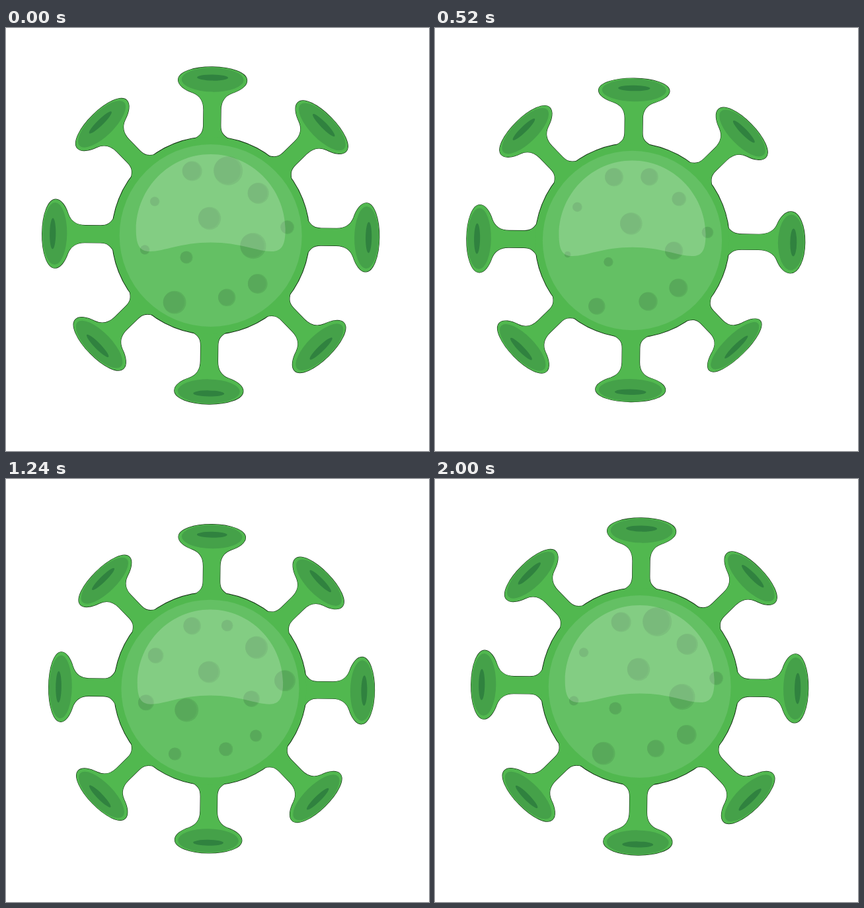
An HTML page with a canvas for the animation above (2040 ms loop, 640 by 640 pixels).

```html
<!DOCTYPE html>
<html lang="en">
<head>
<meta charset="utf-8">
<title>Wobbling virus</title>
<style>
  html, body { margin: 0; width: 100%; height: 100%; overflow: hidden; background: #fff; }
  canvas { display: block; width: 100vmin; height: 100vmin; }
</style>
</head>
<body>
<canvas id="stage" width="640" height="640"></canvas>
<script>
const ctx = document.getElementById('stage').getContext('2d');
const LOOP = 2040, SPAN = 2000, STEP = 40, TURN = 2 * Math.PI;
const BODY = '#51b84f', EDGE = '#143314';
const SPIKES = 8, LAG = 117.5, TILT = 0.7 * Math.PI / 180;

// Path of the centre: time, x, y
const DRIFT = [
  [0, 309.7, 314], [200, 306.2, 318.4], [520, 298.5, 321.5], [720, 295.6, 317.6],
  [1000, 301.6, 314.6], [1480, 314.3, 319.6], [SPAN, 309.7, 314]
];

// Squash, stretch and settle of one spike: time, width, length
const WOBBLE = [[0, 1, 1], [140, 1.07, 0.865], [310, 0.9, 1.12], [460, 1.06, 0.94], [600, 1, 1]];

// Each crater swells and shrinks once per loop: x, y, mean radius, swing, time of its peak
const CRATERS = [
  [-28, -97.5, 14, 1, 0],
  [26.5, -98, 14.2, 7.8, 1980],
  [72, -64, 15, 4.3, 1580],
  [-84.5, -51.5, 9.1, 2.7, 1250],
  [-1.7, -26, 16.8, 0.4, 0],
  [116, -12.5, 12.2, 4, 1350],
  [64.2, 15.7, 15, 4.7, 1930],
  [-36.6, 33, 12.3, 6, 1350],
  [-99.5, 21.6, 8.5, 4, 1400],
  [71.1, 73, 12.3, 3.2, 200],
  [24.5, 93.8, 12.4, 2, 370],
  [-54.6, 101.2, 13, 4.4, 0]
];

const spike = new Path2D(`M-26 -146 C-16 -152 -13 -157 -13 -167 L-13 -190
  C-13 -203 -19 -212 -30 -216 C-42 -220 -52 -227 -52 -235
  C-52 -247 -28 -255 0 -255 C28 -255 52 -247 52 -235
  C52 -227 42 -220 30 -216 C19 -212 13 -203 13 -190
  L13 -167 C13 -157 16 -152 26 -146 Z`);
const shine = new Path2D(`M0 -123 C62 -123 112 -72 113 -10 C113 14 108 24 92 24
  C70 24 45 10.5 0 10.5 C-45 10.5 -70 24 -92 24 C-108 24 -113 14 -113 -10
  C-112 -72 -62 -123 0 -123 Z`);

// Hermite curve through the keys, held at both ends; returns [first, second] value
function smooth(keys, time) {
  const last = keys.length - 1;
  const t = Math.min(Math.max(time, keys[0][0]), keys[last][0]);
  let i = 0;
  while (i < last - 1 && t > keys[i + 1][0]) i++;
  const a = keys[i], b = keys[i + 1];
  const before = keys[Math.max(i - 1, 0)], after = keys[Math.min(i + 2, last)];
  const d = b[0] - a[0], u = (t - a[0]) / d, v = 1 - u;
  return [1, 2].map(c => {
    const slopeA = (b[c] - before[c]) / (b[0] - before[0]);
    const slopeB = (after[c] - a[c]) / (after[0] - a[0]);
    return v * v * (1 + 2 * u) * a[c] + u * u * (3 - 2 * u) * b[c]
         + d * u * v * (v * slopeA - u * slopeB);
  });
}

function ellipse(x, y, rx, ry, color) {
  ctx.beginPath();
  ctx.ellipse(x, y, rx, ry, 0, 0, TURN);
  ctx.fillStyle = color;
  ctx.fill();
}

// Spikes wobble one after another, clockwise from the top
function eachSpike(t, paint) {
  for (let i = 0; i < SPIKES; i++) {
    ctx.save();
    ctx.rotate(i * TURN / SPIKES + TILT);
    ctx.translate(0, -150);
    ctx.scale(...smooth(WOBBLE, t - i * LAG));
    ctx.translate(0, 150);
    paint();
    ctx.restore();
  }
}

function drawCrater([x, y, mean, swing, peak], t, scale) {
  const r = (mean + swing * Math.cos(TURN * (t - peak) / SPAN)) / scale;
  ellipse(x, y, r, r, '#5bb05c');
  ellipse(x - 0.07 * r, y - 0.02 * r, 0.92 * r, 0.92 * r, '#58a95a');
}

function draw(t) {
  const scale = 1 - 0.033 * (1 - Math.abs(2 * t / SPAN - 1));
  ctx.fillStyle = '#fff';
  ctx.fillRect(0, 0, 640, 640);
  ctx.save();
  ctx.translate(...smooth(DRIFT, t));
  ctx.scale(scale, scale);

  // Thin dark rim, then the fill over its inner half
  ctx.strokeStyle = EDGE;
  ctx.lineWidth = 1.3;
  eachSpike(t, () => ctx.stroke(spike));
  ellipse(0, 0, 149.6, 149.6, BODY);
  ctx.stroke();
  eachSpike(t, () => {
    ctx.fillStyle = BODY;
    ctx.fill(spike);
    ellipse(0, -235.7, 47, 18.3, '#45a149');
    ellipse(0, -239, 23.5, 4.6, '#30823f');
  });
  ellipse(0, 0, 149.2, 149.2, BODY);

  ellipse(0, 0, 138, 138, '#64c064');
  CRATERS.forEach(c => drawCrater(c, t, scale));
  ctx.fillStyle = 'rgba(255, 255, 255, 0.2)';
  ctx.fill(shine);
  ctx.restore();
}

const start = performance.now();
function tick() {
  const t = (performance.now() - start) % LOOP;
  draw(Math.floor(t / STEP) * STEP);
  requestAnimationFrame(tick);
}
tick();
</script>
</body>
</html>
```
